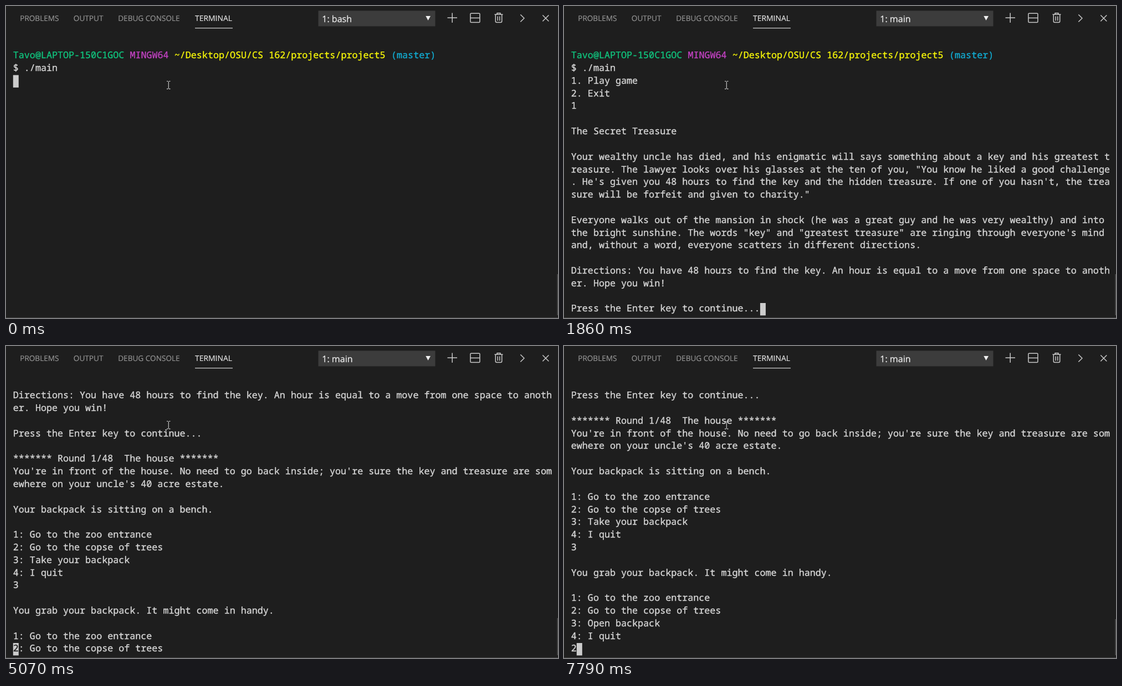
An HTML page with a canvas that plays this animation: 996 by 562 pixels, repeating every 8000 ms.

```html
<!DOCTYPE html>
<html lang="en">
<head>
<meta charset="utf-8">
<title>Terminal game</title>
<style>
html, body { margin: 0; width: 100%; height: 100%; overflow: hidden; background: #1e1e1e; }
canvas { display: block; }
</style>
</head>
<body>
<canvas id="stage" width="996" height="562"></canvas>
<script>
const ctx = document.getElementById('stage').getContext('2d');
const LOOP = 8000;
const BG = '#1e1e1e', TEXT = '#d8d8d8', BLOCK = '#cccccc', ICON = '#c9c9c9';
const MONO = '16.72px "Noto Sans Mono", "DejaVu Sans Mono", monospace';
const UI = '"Open Sans", "Noto Sans", sans-serif';

// Terminal grid
const LEFT = 12.8, TOP = 56, CELL_W = 10.033, CELL_H = 22.81, BASE = 15.4, LAST_ROW = 21;

const PROMPT = [
  ['Tavo@LAPTOP-150C1GOC ', '#10c47e'],
  ['MINGW64 ', '#c242c2'],
  ['~/Desktop/OSU/CS 162/projects/project5 ', '#f8f808'],
  ['(master)', '#12acd2']
];

const LINES = [
  '',
  PROMPT,
  '$ ./main',
  '1. Play game',
  '2. Exit',
  '1',
  '',
  'The Secret Treasure',
  '',
  'Your wealthy uncle has died, and his enigmatic will says something about a key and his greatest t',
  'reasure. The lawyer looks over his glasses at the ten of you, "You know he liked a good challenge',
  '. He\'s given you 48 hours to find the key and the hidden treasure. If one of you hasn\'t, the trea',
  'sure will be forfeit and given to charity."',
  '',
  'Everyone walks out of the mansion in shock (he was a great guy and he was very wealthy) and into ',
  'the bright sunshine. The words "key" and "greatest treasure" are ringing through everyone\'s mind ',
  'and, without a word, everyone scatters in different directions.',
  '',
  'Directions: You have 48 hours to find the key. An hour is equal to a move from one space to anoth',
  'er. Hope you win!',
  '',
  'Press the Enter key to continue...',
  '',
  '******* Round 1/48  The house *******',
  'You\'re in front of the house. No need to go back inside; you\'re sure the key and treasure are som',
  'ewhere on your uncle\'s 40 acre estate.',
  '',
  'Your backpack is sitting on a bench.',
  '',
  '1: Go to the zoo entrance',
  '2: Go to the copse of trees',
  '3: Take your backpack',
  '4: I quit',
  '3',
  '',
  'You grab your backpack. It might come in handy.',
  '',
  '1: Go to the zoo entrance',
  '2: Go to the copse of trees',
  '3: Open backpack',
  '4: I quit',
  '2'
];

// at: start in ms, last: newest line, col: cursor column, bar: top of the scroll thumb;
// the newest line is cut at the cursor unless it is marked full
const STEPS = [
  { at: 0, last: 3, col: 0, bar: 483, shell: 'bash' },
  { at: 70, last: 5, col: 0, bar: 483 },
  { at: 1310, last: 5, col: 1, bar: 483 },
  { at: 1860, last: 21, col: 34, bar: 483 },
  { at: 3750, last: 33, col: 0, bar: 488 },
  { at: 4760, last: 33, col: 1, bar: 488 },
  { at: 5070, last: 38, col: 0, bar: 490, full: true },
  { at: 5300, last: 41, col: 0, bar: 492 },
  { at: 7790, last: 41, col: 1, bar: 492 }
];

function box(x, y, w, h, color) {
  ctx.fillStyle = color;
  ctx.fillRect(x, y, w, h);
}

// A hairline outline of the given weight makes the letters a little heavier
function label(text, x, y, font, color, weight = 0.35) {
  ctx.font = font;
  ctx.fillStyle = ctx.strokeStyle = color;
  ctx.lineWidth = weight;
  ctx.fillText(text, x, y);
  ctx.strokeText(text, x, y);
}

function stroke(path, width = 1.5, color = ICON) {
  ctx.strokeStyle = color;
  ctx.lineWidth = width;
  ctx.stroke(new Path2D(path));
}

function drawTabs() {
  const font = '13.6px ' + UI, color = '#969696';
  label('PROBLEMS', 25.2, 27.3, font, color, 0.15);
  label('OUTPUT', 121.8, 27.3, font, color, 0.15);
  label('DEBUG CONSOLE', 202.2, 27.3, font, color, 0.15);
  label('TERMINAL', 341, 27.3, '13.9px ' + UI, '#e7e7e7', 0.15);
  box(341, 39.3, 68, 1.1, '#e7e7e7');
}

function drawPicker(shell) {
  box(563.5, 8.5, 211, 28, '#3c3c3c');
  label('1: ' + shell, 570.3, 28.8, '16px ' + UI, '#f0f0f0', 0.25);
  ctx.fillStyle = '#f0f0f0';
  ctx.fill(new Path2D('M757.3 18H766L761.6 26Z'));
}

function drawIcons() {
  stroke('M796.5 21.3H814M805.2 12.5V30');
  stroke('M839.3 13.2H853.5Q854.9 13.2 854.9 14.6V28.2Q854.9 29.6 853.5 29.6H839.3Q837.9 29.6 837.9 28.2V14.6Q837.9 13.2 839.3 13.2ZM837.9 21.4H854.9');
  stroke('M881.5 15.2H896.5M886 15V12.8H892V15M883.3 15.5V27.5Q883.3 29.4 885.2 29.4H892.8Q894.7 29.4 894.7 27.5V15.5M887.2 18.5V26.5M890.8 18.5V26.5');
  stroke('M928.3 15.5L935 22L928.3 28.5');
  stroke('M968.3 16.5L979.3 27.5M979.3 16.5L968.3 27.5');
}

function drawLine(line, row) {
  const parts = typeof line === 'string' ? [[line, TEXT]] : line;
  let col = 0;
  for (const [text, color] of parts) {
    label(text, LEFT + col * CELL_W, TOP + row * CELL_H + BASE, MONO, color);
    col += text.length;
  }
}

function drawTerminal({ last, col, full, bar }) {
  const first = Math.max(0, last - LAST_ROW);
  for (let i = first; i < last; i++) drawLine(LINES[i], i - first);

  const row = last - first;
  const newest = full ? LINES[last] : LINES[last].slice(0, col);
  drawLine(newest, row);

  const x = LEFT + col * CELL_W, y = TOP + row * CELL_H;
  box(x, y, 10, 22.4, BLOCK);
  if (newest[col]) label(newest[col], x, y + BASE, MONO, BG);

  box(994.5, bar, 1.5, 557 - bar, '#4f4f4f');
}

function drawPointer() {
  stroke('M290 135.5H292.5M294 135.5H296.5M293.3 136V149M290 149.4H292.5M294 149.4H296.5', 1.1, '#d4d4d4');
}

function draw(t) {
  const step = STEPS.findLast(s => s.at <= t);
  box(0, 0, 996, 562, BG);
  drawTabs();
  drawPicker(step.shell || 'main');
  drawIcons();
  drawTerminal(step);
  drawPointer();
  box(0, 561, 996, 1, '#414141');
}

let start;
function frame(now) {
  start ??= now;
  draw((now - start) % LOOP);
  requestAnimationFrame(frame);
}

ctx.textRendering = 'geometricPrecision';
ctx.lineJoin = 'round';
requestAnimationFrame(frame);
</script>
</body>
</html>
```
